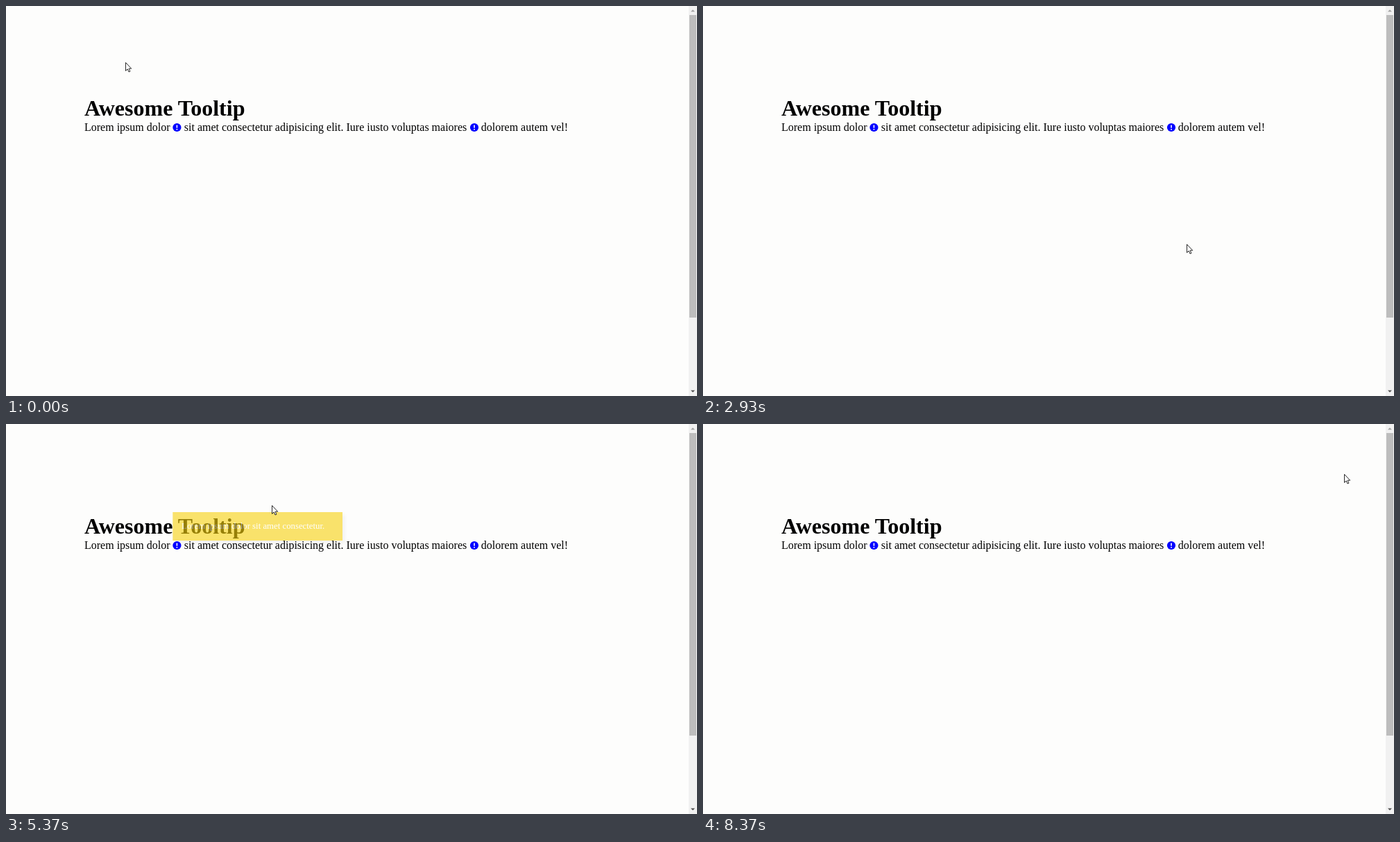
Write an HTML page that moves like this. It is 996 px wide and 562 px high and loops after 8.4 s.

```html
<!DOCTYPE html>
<html lang="en">
<head>
<meta charset="utf-8">
<title>Awesome Tooltip</title>
<style>
  html, body { margin: 0; width: 100%; height: 100%; overflow: hidden; background: #fdfdfc; }
  svg { display: block; width: 996px; height: 562px; }
  text { font-family: "Liberation Serif", "Times New Roman", serif; font-size: 16px; white-space: pre; }
  .title { font-size: 32px; font-weight: bold; }
  .tip text { font-size: 12.8px; }
</style>
</head>
<body>
<svg viewBox="0 0 996 562">
  <defs>
    <filter id="shadow" x="-10%" y="-40%" width="120%" height="200%">
      <feDropShadow dx="4" dy="4" stdDeviation="2.6" flood-color="#000" flood-opacity=".07"/>
    </filter>
    <g id="info">
      <circle r="6.1" fill="#00f"/>
      <path d="M0-3.5V.7M0 2.1V3.7" stroke="#fff" stroke-width="1.6"/>
    </g>
    <g id="close">
      <circle r="6.1" fill="#00f"/>
      <path d="M-2-2L2 2M2-2L-2 2" stroke="#fff" stroke-width="1.5"/>
    </g>
  </defs>
  <rect width="996" height="562" fill="#fdfdfc"/>

  <rect x="984" width="12" height="562" fill="#f1f1f1"/>
  <rect x="985" y="13" width="10" height="436" fill="#bdbdbd"/>
  <path d="M987 8.2L990 5.2 993 8.2Z" fill="#a3a3a3"/>
  <path d="M987 553.8L990 556.8 993 553.8Z" fill="#505050"/>

  <text class="title" x="113" y="158">Awesome Tooltip</text>
  <text x="113" y="180">Lorem ipsum dolor</text>
  <text x="256.8" y="180">sit amet consectetur adipisicing elit. Iure iusto voluptas maiores</text>
  <text x="684.8" y="180">dolorem autem vel!</text>

  <g class="tip">
    <rect x="240.3" y="125" width="244.7" height="41" fill="#f8d20c" filter="url(#shadow)"/>
    <text x="253.1" y="149" fill="#fff">Lorem ipsum dolor sit amet consectetur.</text>
  </g>
  <g class="tip">
    <rect x="668.6" y="125" width="244.7" height="41" fill="#eee" filter="url(#shadow)"/>
    <text x="681.4" y="149" fill="#222">Now, this is real message</text>
  </g>

  <use class="icon" x="246.4" y="175"/>
  <use class="icon" x="675" y="175"/>

  <path id="cursor" d="M.5 .5V12.4L3.2 9.9 5 14 6.9 13.2 5.1 9.2H8.7Z" fill="#fff" stroke="#111" stroke-width=".9"/>
</svg>
<script>
const LOOP = 8400;
const FADE = 560;
const SLIDE = 5;

const tips = document.querySelectorAll('.tip');
const icons = document.querySelectorAll('.icon');
const cursor = document.getElementById('cursor');

const clamp = v => Math.min(1, Math.max(0, v));
const smooth = v => v * v * (3 - 2 * v);
const progress = (t, from, to) => clamp((t - from) / (to - from));

const hovers = [
  { on: 4370, off: 5130 },
  { on: 6650, off: 7490 }
];

// One clockwise sweep around the page, slightly tilted
const sweep = { from: 1790, to: 3490 };
function sweepAt(u) {
  const a = Math.PI * (1 + 2 * u), tilt = Math.PI / 12;
  return { x: 561 + 286 * Math.cos(a), y: 174 + 174 * Math.sin(a + tilt) };
}

// Eased pointer moves; bow bends the way up or down, rests lie between moves
const home = { x: 172, y: 81 };
const edge = sweepAt(0);
const moves = [
  { from: 0, to: 1030, x: 197, y: 78 },
  { from: 1030, to: 1450, x: 709, y: 222 },
  { from: 1450, to: sweep.from, ...edge, bow: 40 },
  { from: sweep.to, to: 4330, x: 248, y: 177 },
  { from: 5130, to: 5700, x: 598, y: 108, bow: -35 },
  { from: 5870, to: 6210, x: 722, y: 187 },
  { from: 6210, to: 6440, x: 672, y: 171 },
  { from: 7490, to: 8370, x: 924, y: 72, bow: 40 }
];

function pointer(t) {
  if (t > sweep.from && t < sweep.to) return sweepAt(progress(t, sweep.from, sweep.to));
  let { x, y } = home;
  for (const m of moves) {
    if (t < m.from) break;
    const s = smooth(progress(t, m.from, m.to));
    x += (m.x - x) * s;
    y += (m.y - y) * s + 4 * s * (1 - s) * (m.bow || 0);
  }
  return { x, y };
}

function draw(t) {
  hovers.forEach(({ on, off }, i) => {
    const shown = smooth(progress(t, on, on + FADE)) * (1 - smooth(progress(t, off, off + FADE)));
    tips[i].setAttribute('opacity', shown);
    tips[i].setAttribute('transform', `translate(0 ${SLIDE * (1 - shown)})`);
    icons[i].setAttribute('href', t >= on && t < off ? '#close' : '#info');
  });
  const { x, y } = pointer(t);
  cursor.setAttribute('transform', `translate(${Math.round(x)} ${Math.round(y)})`);
}

const start = performance.now();
function tick(now) {
  draw(Math.max(0, now - start) % LOOP);
  requestAnimationFrame(tick);
}
draw(0);
requestAnimationFrame(tick);
</script>
</body>
</html>
```
